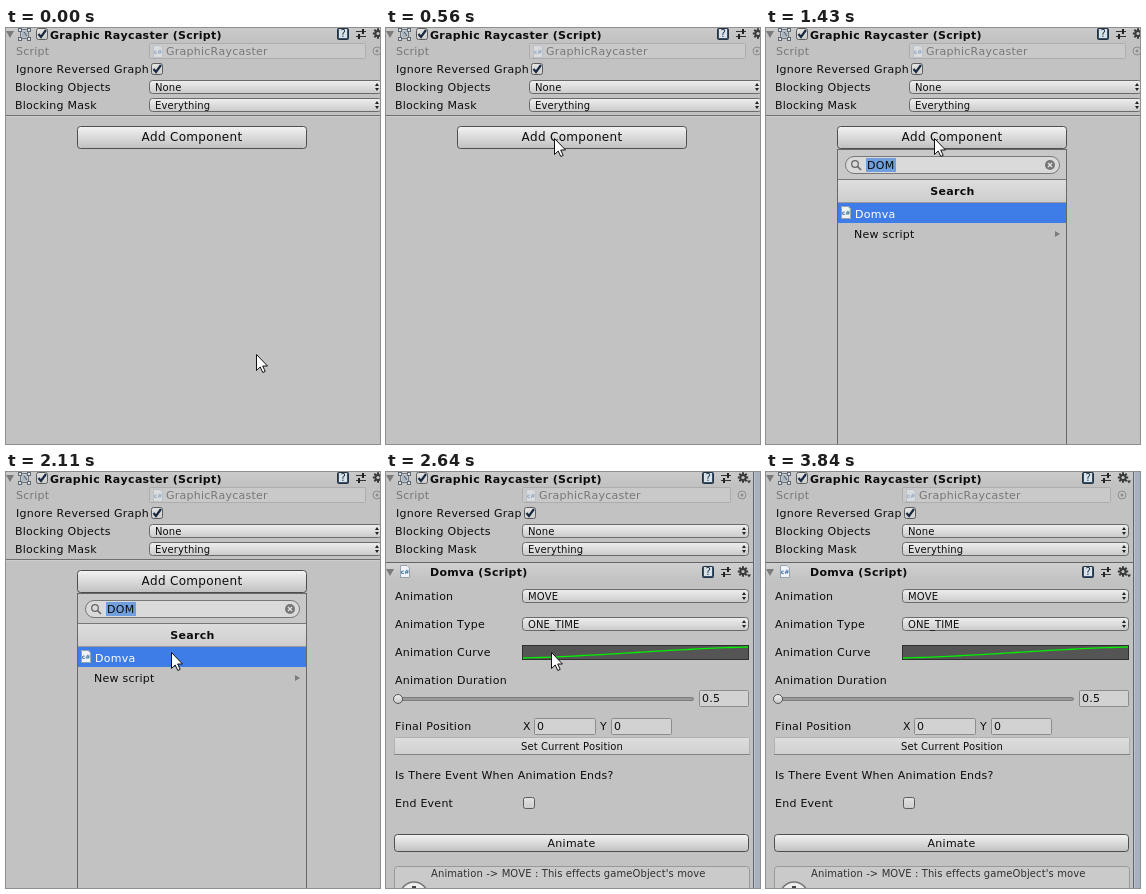
Recreate the animation shown at these times as an HTML page with a canvas. Size 374 by 416 pixels, loop 4.76 s.

```html
<!DOCTYPE html>
<html lang="en">
<head>
<meta charset="utf-8">
<title>Inspector</title>
<style>
html, body { margin: 0; width: 100%; height: 100%; overflow: hidden; background: #c2c2c2; }
canvas { display: block; }
</style>
</head>
<body>
<canvas id="stage" width="374" height="416"></canvas>
<script>
const W = 374, H = 416, LOOP = 4760;
const ctx = document.getElementById('stage').getContext('2d');
const FAMILY = '"DejaVu Sans", Verdana, sans-serif';
const STYLES = {
  label: ['11px', 0.25],
  bold: ['bold 11px', 0.3],
  mini: ['10px', 0.1],
  large: ['12px', 0.3],
  tiny: ['bold 6px', 0]
};

function text(str, x, y, style = 'label', color = '#0c0c0c', align = 'left') {
  const [font, spacing] = STYLES[style];
  ctx.font = `${font} ${FAMILY}`;
  ctx.letterSpacing = spacing + 'px';
  ctx.fontKerning = 'none';
  ctx.textAlign = align;
  ctx.fillStyle = color;
  ctx.fillText(str, x, y);
}

function rect(x, y, w, h, color) {
  ctx.fillStyle = color;
  ctx.fillRect(x, y, w, h);
}

function shade(y, h, top, bottom) {
  const g = ctx.createLinearGradient(0, y, 0, y + h);
  g.addColorStop(0, top);
  g.addColorStop(1, bottom);
  return g;
}

function box(x, y, w, h, r, fill, stroke) {
  ctx.beginPath();
  ctx.roundRect(x + 0.5, y + 0.5, w - 1, h - 1, r);
  ctx.fillStyle = fill;
  ctx.fill();
  ctx.strokeStyle = stroke;
  ctx.lineWidth = 1;
  ctx.stroke();
}

function poly(points, fill) {
  ctx.beginPath();
  points.forEach(([x, y]) => ctx.lineTo(x, y));
  ctx.closePath();
  ctx.fillStyle = fill;
  ctx.fill();
}

function line(points, color, width = 1) {
  ctx.beginPath();
  points.forEach(([x, y]) => ctx.lineTo(x, y));
  ctx.strokeStyle = color;
  ctx.lineWidth = width;
  ctx.stroke();
}

function disc(x, y, r, fill, stroke, width = 1) {
  ctx.beginPath();
  ctx.arc(x, y, r, 0, Math.PI * 2);
  if (fill) { ctx.fillStyle = fill; ctx.fill(); }
  if (stroke) { ctx.strokeStyle = stroke; ctx.lineWidth = width; ctx.stroke(); }
}

function button(label, x, y, w, h, style, baseline) {
  box(x, y, w, h, 3, shade(y, h, '#f4f4f4', '#bfbfbf'), '#4e4e4e');
  text(label, x + w / 2, baseline, style, '#0c0c0c', 'center');
}

function popup(label, x, y, w) {
  box(x, y, w, 14, 3, shade(y, 14, '#f0f0f0', '#c9c9c9'), '#6a6a6a');
  text(label, x + 6, y + 11, 'mini');
  const ax = x + w - 5, ay = y + 7;
  poly([[ax - 2, ay - 1], [ax, ay - 4], [ax + 2, ay - 1]], '#222');
  poly([[ax - 2, ay + 1], [ax, ay + 4], [ax + 2, ay + 1]], '#222');
}

function field(label, x, y, w) {
  box(x, y, w, 17, 1, '#d2d2d2', '#8c8c8c');
  text(label, x + 3, y + 12);
}

function checkbox(x, y, on) {
  box(x, y, 12, 12, 2, shade(y, 12, '#e4e4e4', '#cbcbcb'), '#5c5c5c');
  if (on) line([[x + 2.5, y + 6], [x + 5, y + 9], [x + 10, y + 2]], '#17293f', 2.2);
}

function scriptIcon(x, y, faded) {
  ctx.globalAlpha = faded ? 0.45 : 1;
  poly([[x, y], [x + 7, y], [x + 10, y + 3], [x + 10, y + 13], [x, y + 13]], '#f0f4f8');
  line([[x + 0.5, y + 13], [x + 0.5, y + 0.5], [x + 7, y + 0.5], [x + 9.5, y + 3], [x + 9.5, y + 12.5], [x, y + 12.5]], '#98a2ac');
  text('c#', x + 5, y + 9, 'tiny', '#3c6fa8', 'center');
  ctx.globalAlpha = 1;
}

function foldout(y) {
  poly([[0, y], [8, y], [4, y + 7]], '#7b7b7b');
}

// Help book, preset sliders and gear
function tools(x, y) {
  box(x, y, 12, 12, 1, '#34506a', '#26323d');
  rect(x + 2, y + 1, 8, 9, '#d9e2e9');
  text('?', x + 6.2, y + 9, 'mini', '#1c3248', 'center');
  const sx = x + 19;
  rect(sx, y + 3, 10, 1, '#333');
  rect(sx, y + 8, 10, 1, '#333');
  rect(sx + 6, y + 1, 2, 5, '#222');
  rect(sx + 2, y + 6, 2, 5, '#222');
  const gx = x + 41, gy = y + 5.5;
  for (let i = 0; i < 4; i++) {
    const a = i * Math.PI / 4, c = Math.cos(a) * 5.2, s = Math.sin(a) * 5.2;
    line([[gx - c, gy - s], [gx + c, gy + s]], '#3a3a3a', 2);
  }
  disc(gx, gy, 3.5, '#3a3a3a');
  disc(gx, gy, 1.6, '#c6c6c6');
  poly([[gx + 4, gy + 3], [gx + 8, gy + 3], [gx + 6, gy + 6]], '#333');
}

function raycastIcon() {
  line([[14.5, 1.5], [22.5, 1.5], [22.5, 10.5], [14.5, 10.5], [14.5, 1.5]], '#6c7680');
  rect(16, 3, 5, 6, '#a9b5c0');
  for (const x of [12, 21]) for (const y of [0, 9]) {
    rect(x, y, 4, 4, '#606a74');
    rect(x + 1, y + 1, 2, 2, '#dde2e6');
  }
  line([[18, 4], [21, 8]], '#505a64');
}

function raycaster(added) {
  const left = added ? 136 : 143;
  const right = added ? 363 : 376;
  const pick = added ? 356 : 371;
  rect(0, 0, W, 13, shade(0, 13, '#cacaca', '#c2c2c2'));
  foldout(3);
  raycastIcon();
  checkbox(30, 0, true);
  text('Graphic Raycaster (Script)', 44, 11, 'bold');
  tools(added ? 316 : 331, 0);

  text('Script', 10, 27, 'label', '#777');
  box(left, 15, pick - 11 - left, 16, 1, '#c9c9c9', '#adadad');
  scriptIcon(left + 4, 17, true);
  text('GraphicRaycaster', left + 17, 27, 'label', '#777');
  disc(pick, 23, 4, null, '#8d8d8d');
  disc(pick, 23, 1.5, '#8d8d8d');

  ctx.save();
  ctx.beginPath();
  ctx.rect(0, 32, left - 1, 18);
  ctx.clip();
  text('Ignore Reversed Graphics', 10, 45);
  ctx.restore();
  checkbox(left + 2, 35, true);

  text('Blocking Objects', 9, 63);
  popup('None', left, 52, right - left);
  text('Blocking Mask', 9, 81);
  popup('Everything', left, 70, right - left);
}

function addButton() {
  rect(0, 87, W, 1, '#6f6f6f');
  rect(0, 88, W, 1, '#cdcdcd');
  button('Add Component', 71, 98, 230, 23, 'large', 113);
}

function searchMenu() {
  rect(71, 121, 230, 295, '#686868');
  rect(72, 122, 228, 294, '#c2c2c2');
  rect(72, 122, 228, 29, '#c8c8c8');
  box(79, 128, 215, 18, 9, '#dadada', '#777');
  disc(89, 136, 3.3, null, '#666', 1.3);
  line([[91.5, 138.5], [95, 142]], '#666', 1.6);
  rect(100, 130, 30, 14, '#6f9fdd');
  text('DOM', 101, 141);
  disc(284, 137, 5, '#777');
  line([[282, 135], [286, 139]], '#e4e4e4', 1.3);
  line([[286, 135], [282, 139]], '#e4e4e4', 1.3);

  rect(72, 151, 228, 24, shade(151, 24, '#dedede', '#cdcdcd'));
  rect(72, 151, 228, 1, '#777');
  rect(72, 174, 228, 1, '#999');
  text('Search', 186.5, 167, 'bold', '#0c0c0c', 'center');

  rect(72, 175, 228, 20, '#3e7de7');
  scriptIcon(75, 178);
  text('Domva', 89, 190, 'label', '#fff');
  text('New script', 88, 210);
  poly([[289, 203], [294, 206], [289, 209]], '#7b7b7b');
}

function curve() {
  rect(136, 173, 227, 15, '#303030');
  rect(137, 174, 225, 13, '#555');
  const points = [];
  for (let i = 0; i <= 40; i++) {
    const u = i / 40;
    const v = 0.5 * u + 0.5 * u * u * (3 - 2 * u);
    points.push([137 + 225 * u, 186 - 11 * v]);
  }
  line(points, '#00f000', 1.3);
}

function addedScript() {
  rect(0, 90, 367, 1, '#656565');
  rect(0, 91, 367, 17, shade(91, 17, '#d0d0d0', '#c2c2c2'));
  foldout(97);
  scriptIcon(14, 93);
  text('Domva (Script)', 44, 104, 'bold');
  tools(316, 94);

  text('Animation', 9, 128);
  popup('MOVE', 136, 117, 227);
  text('Animation Type', 9, 156);
  popup('ONE_TIME', 136, 145, 227);
  text('Animation Curve', 9, 184);
  curve();

  text('Animation Duration', 9, 212);
  box(9, 225, 299, 4, 2, '#999', '#7d7d7d');
  disc(12, 227, 4.5, shade(222, 10, '#f4f4f4', '#c4c4c4'), '#555');
  field('0.5', 313, 218, 50);

  text('Final Position', 9, 258);
  text('X', 137, 258);
  field('0', 148, 246, 62);
  text('Y', 214, 258);
  field('0', 225, 246, 61);

  box(8, 265, 356, 18, 1, shade(265, 18, '#dedede', '#cfcfcf'), '#b1b1b1');
  rect(8, 282, 356, 1, '#858585');
  text('Set Current Position', 186, 278, 'mini', '#0c0c0c', 'center');

  text('Is There Event When Animation Ends?', 9, 307);
  text('End Event', 9, 335);
  checkbox(137, 325, false);
  button('Animate', 8, 362, 355, 18, 'label', 375);

  box(8, 394, 356, 40, 3, '#cacaca', '#999');
  text('Animation -> MOVE : This effects gameObject\'s move', 45, 405, 'mini', '#303030');
  disc(28, 424, 14, '#eee', '#777', 1.5);
  rect(26, 414, 4, 4, '#444');

  rect(367, 0, 1, H, '#5e6670');
  rect(368, 0, 6, H, '#a8b1bf');
  rect(368, 0, 1, H, '#bdc5d0');
}

function pointer([x, y]) {
  const shape = [[0.5, 0.5], [0.5, 16.5], [4.2, 13], [6.8, 18.5], [9.2, 17.4], [6.7, 12], [11.5, 12]]
    .map(([px, py]) => [x + px, y + py]);
  poly(shape, '#fff');
  line([...shape, shape[0]], '#111');
}

const clamp = u => Math.max(0, Math.min(1, u));
const ease = u => { u = clamp(u); return u * u * (3 - 2 * u); };
const sample = (t, start, count) => clamp((Math.floor((t - start) / 70) + 1) / count);

function mouse(t) {
  if (t < 1830) {
    const u = sample(t, 70, 8);
    return [250 - 91 * ease(u / 0.75) + 9 * ease((u - 0.75) / 0.25), 326 - 216 * ease(u)].map(Math.round);
  }
  if (t < 3500) {
    const u = ease(sample(t, 1830, 5));
    return [168 - 3 * u, 110 + 70 * u].map(Math.round);
  }
  if (t >= 3840) return null;
  const u = Math.pow(sample(t, 3500, 4), 1.5);
  return [165 + 142 * u, 180 + 222 * u].map(Math.round);
}

const within = (t, from, to) => t >= from && t < to;

function draw(t) {
  const added = t >= 2640;
  rect(0, 0, W, H, '#c2c2c2');
  raycaster(added);
  if (added) addedScript();
  else addButton();
  if (within(t, 1430, 2440)) searchMenu();

  const pos = mouse(t);
  if (!pos) return;
  if (within(t, 760, 830) || within(t, 1230, 1300)) {
    disc(pos[0], pos[1], 12, 'rgba(255, 255, 0, 0.47)');
  }
  pointer(pos);
}

const began = performance.now();
function tick() {
  draw((performance.now() - began) % LOOP);
  requestAnimationFrame(tick);
}
tick();
</script>
</body>
</html>
```
